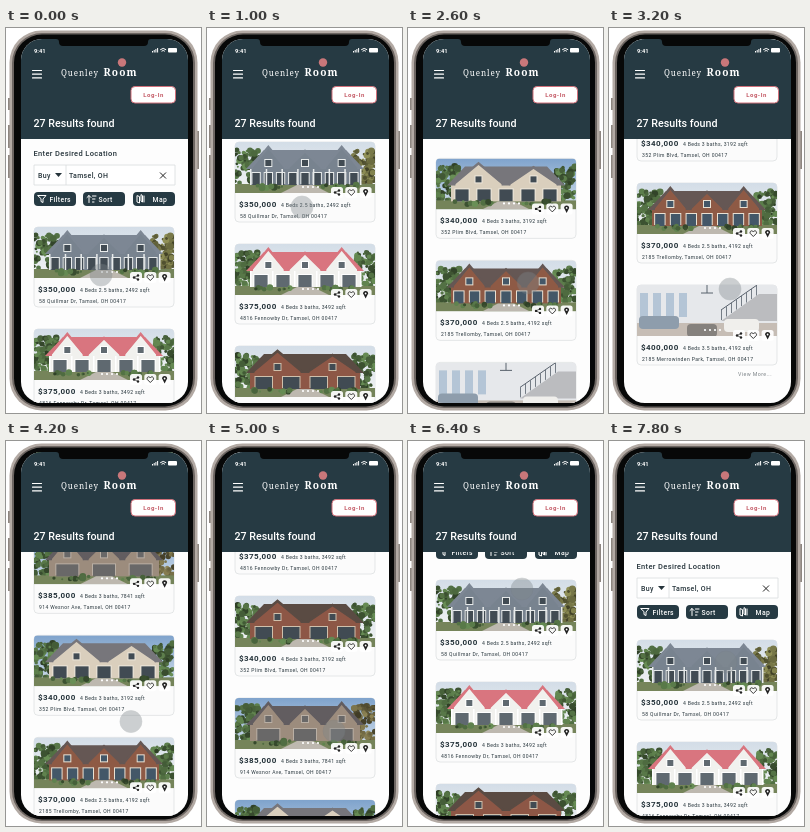
Animation of 195x385 px, one loop 8 s. Source, as an HTML page:

```html
<!DOCTYPE html>
<html lang="en">
<head>
<meta charset="utf-8">
<title>House listings</title>
<style>
  html, body { margin: 0; width: 100%; height: 100%; overflow: hidden; background: #fff; }
  #stage { display: block; width: 100%; height: 100%; }
  text { font-family: Roboto, sans-serif; fill: #26343b; white-space: pre; }
  .serif { font-family: "Noto Serif", serif; fill: #fff; }
  .white { fill: #fff; }
  .line { fill: none; stroke: #fff; stroke-linecap: round; stroke-linejoin: round; }
</style>
</head>
<body>
<svg id="stage" viewBox="0 0 195 385">
  <defs>
    <clipPath id="screen"><rect x="15" y="11" width="167" height="364" rx="21"/></clipPath>
    <clipPath id="photo"><rect width="140" height="60" rx="4"/></clipPath>
    <linearGradient id="pale" x2="0" y2="1"><stop stop-color="#d3dde7"/><stop offset="1" stop-color="#f3f4f4"/></linearGradient>
    <linearGradient id="blue" x2="0" y2="1"><stop stop-color="#7fa3cc"/><stop offset="1" stop-color="#d5e1ec"/></linearGradient>
  </defs>

  <path d="M3 70v12M3 97v23M3 127v23M192 103v38" stroke="#8d8680" stroke-width="2"/>
  <rect x="3.500" y="2.500" width="188" height="380" rx="32" fill="#b3aaa4"/>
  <rect x="6" y="5" width="183" height="375" rx="30" fill="#6d6662"/>
  <rect x="8" y="6.500" width="179" height="372" rx="28" fill="#070808"/>

  <g clip-path="url(#screen)">
    <rect width="195" height="385" fill="#fdfdfd"/>
    <g id="page"></g>
    <rect width="195" height="111" fill="#263a43"/>
    <path d="M50 11q3 0 3 3q0 4 4 4h81q4 0 4-4q0-3 3-3z" fill="#070808"/>
    <g id="status" class="white">
      <text class="white" x="28" y="24.500" font-size="5.800" font-weight="700">9:41</text>
      <path class="line" d="M154.500 21.500q2.700-2.400 5.400 0M155.800 23q1.400-1.300 2.800 0"/>
      <rect x="162" y="20" width="9" height="4.500" rx="1"/>
    </g>
    <path class="line" d="M26.500 42.500h9m-9 3.700h9m-9 3.700h9" stroke-width="1.200"/>
    <circle cx="116" cy="34.500" r="4.200" fill="#c9777a"/>
    <text class="serif" x="55" y="48" font-size="8" letter-spacing=".9">Quenley</text>
    <text class="serif" x="97.500" y="48" font-size="10.200" font-weight="900" letter-spacing="1.100">Room</text>
    <rect x="125" y="58.500" width="44.500" height="16.500" rx="4" fill="#fff" stroke="#d2707a"/>
    <text x="147.500" y="69" font-size="6" font-weight="700" letter-spacing=".5" text-anchor="middle" style="fill:#c45a66">Log-In</text>
    <text class="white" x="27.500" y="99" font-size="10.700" font-weight="500">27 Results found</text>
  </g>
  <circle id="touch" r="11" fill="#7f878b" stroke="#747d82" stroke-width=".6" opacity=".38"/>
</svg>

<script>
const LOOP = 8, STEP = .2;
const PITCH = 102, FIRST_TOP = 199;

let seed = 7;
const random = () => (seed = seed * 16807 % 2147483647) / 2147483647;
const repeat = (n, make) => Array.from({ length: n }, (_, i) => make(i)).join('');
const rect = (fill, x, y, w, h) => `<rect x="${x}" y="${y}" width="${w}" height="${h}" fill="${fill}"/>`;
const label = (x, y, size, text, attrs = '') => `<text x="${x}" y="${y}" font-size="${size}" ${attrs}>${text}</text>`;

// Foliage: small blobs in mixed shades of one hue inside a box.
const leaves = (hue, x, y, w, h) => repeat(Math.ceil(w * h / 9), () =>
  `<circle cx="${x + random() * w}" cy="${y + random() * h}" r="${1 + random() * 2.500}"
    fill="hsl(${hue} 25% ${20 + random() * 25}%)"/>`);

// A front view: trees, a long roof, evenly spaced gables, and openings along the wall.
function house({ sky = 'pale', roof, wall, trim, gables, doors, doorColor = '#414b53', porch = 0, hue = 100 }) {
  const left = 15, width = 110, eaves = 25, ground = 43;
  const bay = width / gables, slot = width / doors;
  const gable = i => {
    const x = left + bay * (i + .5), half = bay * .42, peak = 5 + i % 2 * 4;
    return `<path d="M${x - half} ${eaves}L${x} ${peak}L${x + half} ${eaves}V${eaves + 4}H${x - half}Z" fill="${wall}"/>
      <path d="M${x - half - 2} ${eaves + 1}L${x} ${peak}L${x + half + 2} ${eaves + 1}" fill="none" stroke="${roof}" stroke-width="2.500"/>`
      + rect(trim, x - 4, 17, 8, 8) + rect(doorColor, x - 3, 18, 6, 6);
  };
  const opening = i => {
    const x = left + slot * (i + .2), w = slot * .6;
    return rect(trim, x - 1, 30, w + 2, 12) + rect(doorColor, x, 31, w, 12);
  };
  return rect(`url(#${sky})`, 0, 0, 140, 51)
    + leaves(100, 0, 8, 24, 34) + leaves(hue, 118, 8, 22, 34)
    + rect('#75845a', 0, ground - 1, 140, 9)
    + rect(wall, left, eaves, width, ground - eaves)
    + `<path d="M${left - 4} ${eaves + 2}L${left + 14} 8H${left + width - 14}L${left + width + 4} ${eaves + 2}Z" fill="${roof}"/>`
    + repeat(gables, gable) + repeat(doors, opening)
    + repeat(porch, i => rect(trim, left + i * width / (porch - 1), 27, 1.500, 16))
    + `<path d="M62 ${ground}H78L94 51H46Z" fill="#bdb8af"/>`
    + leaves(100, 18, ground, 38, 3) + leaves(100, 86, ground, 38, 3);
}

function livingRoom() {
  const sofa = (x, y, w, fill) => `<rect x="${x}" y="${y}" width="${w}" height="13" rx="4" fill="${fill}"/>`;
  return rect('#e6e8eb', 0, 0, 140, 51) + rect('#c6bdb5', 0, 38, 140, 13)
    + repeat(4, i => rect('#b4c5d6', 3 + i * 13, 8, 8, 24))
    + '<path d="M84 36L122 9H140V36Z" fill="#bbbcbf"/>'
    + repeat(8, i => rect('#59626d', 84 + i * 5, 25 - i * 3.500, .8, 10))
    + '<path d="M84 25L120 0M70 0V8M64 8H76" stroke="#59626d"/>'
    + sofa(2, 31, 40, '#8e9dac') + sofa(87, 34, 35, '#f0efec') + sofa(50, 39, 30, '#85817d');
}

const villa = { roof: '#7d8794', wall: '#78838f', trim: '#e8ebeb', gables: 3, doors: 9, porch: 8, hue: 60 };
const cottage = { roof: '#d9757f', wall: '#f1f1ee', trim: '#fff', gables: 3, doors: 5, doorColor: '#5f6970', porch: 6 };
const brick = { roof: '#5a4b43', wall: '#8d5746', trim: '#cfc0ac', gables: 2, doors: 4 };
const stone = { sky: 'blue', roof: '#625d60', wall: '#9c8c7d', trim: '#b9afa4', gables: 3, doors: 3, doorColor: '#696868', hue: 50 };
const stucco = { sky: 'blue', roof: '#77767b', wall: '#dacfbd', trim: '#eee8dc', gables: 2, doors: 5 };
const townhouse = { roof: '#655754', wall: '#8e5a45', trim: '#e9e1d3', gables: 3, doors: 7, doorColor: '#435768' };

const listings = [
  ['350', '4 Beds 2.5 baths, 2492 sqft', '58 Quillmar Dr', house(villa)],
  ['375', '4 Beds 3 baths, 3492 sqft', '4816 Fennowby Dr', house(cottage)],
  ['340', '4 Beds 3 baths, 3192 sqft', '352 Plim Blvd', house(brick)],
  ['385', '4 Beds 3 baths, 7841 sqft', '914 Wesnor Ave', house(stone)],
  ['340', '4 Beds 3 baths, 3192 sqft', '352 Plim Blvd', house(stucco)],
  ['370', '4 Beds 2.5 baths, 4192 sqft', '2185 Trellomby', house(townhouse)],
  ['400', '4 Beds 3.5 baths, 4192 sqft', '2185 Merrowinden Park', livingRoom()],
];

const actions = [
  '<path d="M2-2L-2 0L2 2" fill="none" stroke="#222" stroke-width=".7"/>'
    + repeat(3, i => `<circle cx="${i === 1 ? -2 : 2}" cy="${i * 2 - 2}" r="1.200" fill="#222"/>`),
  '<path d="M0 3L-3 0C-4-2-1.500-4 0-1.600C1.500-4 4-2 3 0Z" fill="none" stroke="#222" stroke-width=".9"/>',
  '<path d="M0 4L-2.500-1A2.500 2.500 0 0 1 2.500-1Z" fill="#222"/><circle cy="-1" r=".9" fill="#fff"/>',
];

function card([price, details, street, photo], i) {
  const buttons = actions.map((icon, k) => `<g transform="translate(${102 + 14.300 * k} 50.500)">
    <rect x="-6" y="-5.500" width="12" height="11" rx="2.500" fill="#fff" fill-opacity=".93"/>${icon}</g>`).join('');
  const dots = repeat(4, k => `<circle cx="${68 + 5 * k}" cy="45" r="1.100" fill="#fff"/>`);
  return `<g transform="translate(28 ${FIRST_TOP + PITCH * i})">
    <rect width="140" height="80" rx="4" fill="#fbfbfb" stroke="#dfe1e2" stroke-width=".8"/>
    <svg width="140" height="51"><g clip-path="url(#photo)">${photo}</g></svg>${dots}${buttons}
    ${label(4, 65, 8, `$${price},000`, 'font-weight="700" letter-spacing=".45"')}
    ${label(46, 64.500, 5.100, details, 'letter-spacing=".3"')}
    ${label(5, 75.500, 5, `${street}, Tamsel, OH 00417`, 'letter-spacing=".4"')}</g>`;
}

const chip = (x, text, icon) => rect('#263a43" rx="4', x, 164, 42, 14)
  + `<path class="line" transform="translate(${x + 8} 171)" d="${icon}"/>`
  + label(x + 15.500, 173.500, 6.800, text, 'class="white" font-weight="500" letter-spacing=".35"');

const medium = 'font-weight="500" letter-spacing=".35"';
const searchForm = label(27.500, 128, 7.500, 'Enter Desired Location', medium)
  + '<path d="M28 137H169V157H28ZM60 137V157" fill="#fff" stroke="#d9dcde" stroke-width=".8"/>'
  + label(32, 149.500, 7, 'Buy', medium) + '<path d="M49 145h7l-3.500 4z" fill="#26343b"/>'
  + label(63, 149.500, 7, 'Tamsel, OH', medium)
  + '<path d="M154 144.500l6 6m0-6l-6 6" stroke="#222"/>'
  + chip(28, 'Filters', 'M-4-3.500H4L1 0V3.500L-1 2.500V0Z')
  + chip(77, 'Sort', 'M-2 3.500V-3.500l-2 2m2-2l2 2M1.500-3H5M1.500 0H4M1.500 3H3')
  + chip(127, '  Map', 'M-4-3v6l2.500 1v-6zM0-4v6l1.500 1v-6zM3-3v6');

const page = document.getElementById('page');
const touch = document.getElementById('touch');
page.innerHTML = searchForm + listings.map(card).join('')
  + label(129, 902, 5.300, 'View More...', 'letter-spacing=".4" style="fill:#7d8488"');
document.getElementById('status').innerHTML += repeat(4, i => rect('#fff', 146 + i * 1.700, 23 - i, 1, 1.500 + i));

// Key poses: seconds, scroll offset, touch x, touch y.
const poses = [
  [0, 0, 95, 247], [1, 85, 95, 179], [2, 336, 119, 247], [3.2, 554, 121, 261],
  [5, 248, 127, 290], [6.4, 60, 114, 148], [7.6, 0, 117, 221], [LOOP, 0, 117, 221],
];

// Smooth curve through one column of the poses that never overshoots.
function pose(column, t) {
  const slope = i => (poses[i + 1][column] - poses[i][column]) / (poses[i + 1][0] - poses[i][0]);
  const tangent = i => {
    if (i === 0 || i === poses.length - 1) return 0;
    const a = slope(i - 1), b = slope(i);
    return a * b > 0 ? 2 * a * b / (a + b) : 0;
  };
  const i = poses.findLastIndex(p => p[0] <= t);
  const span = poses[i + 1][0] - poses[i][0];
  const a = poses[i][column], b = poses[i + 1][column];
  const u = (t - poses[i][0]) / span, v = 1 - u;
  return a * (1 + 2 * u) * v * v + b * u * u * (3 - 2 * u)
    + span * u * v * (tangent(i) * v - tangent(i + 1) * u);
}

function draw() {
  const t = Math.floor(performance.now() / 1000 % LOOP / STEP) * STEP;
  page.setAttribute('transform', `translate(0 ${-pose(1, t)})`);
  touch.setAttribute('cx', pose(2, t));
  touch.setAttribute('cy', pose(3, t));
  requestAnimationFrame(draw);
}
draw();
</script>
</body>
</html>
```
